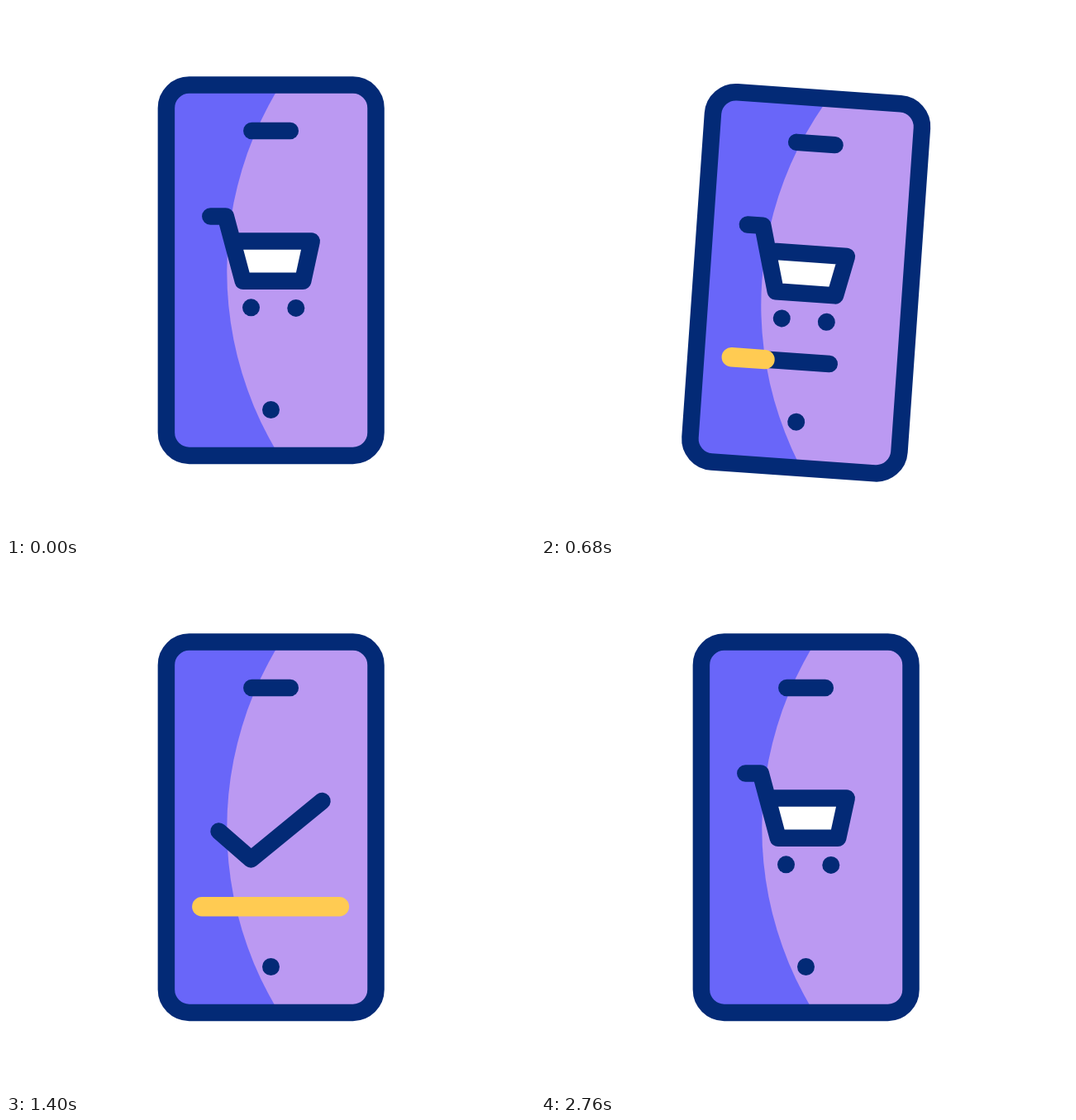
These frames come from a looping animation (640x640 px, 3 s). An HTML page with a canvas:

```html
<!DOCTYPE html>
<html lang="en">
<head>
<meta charset="utf-8">
<title>Mobile checkout</title>
<style>
  html, body { margin: 0; width: 100%; height: 100%; overflow: hidden; background: #fff; }
  canvas { display: block; width: 640px; height: 640px; }
</style>
</head>
<body>
<canvas id="stage" width="640" height="640"></canvas>
<script>
const ctx = document.getElementById('stage').getContext('2d');
const LOOP = 3000;
const NAVY = '#032a76', BLUE = '#6966f9', LILAC = '#bb99f2', YELLOW = '#ffcb52';
const LINE = 20.5;
const CENTER = { x: 320.7, y: 319.75 };

// Cubic-bezier easing with control points (x1, 0) and (x2, 1).
function bezier(x1, x2) {
  return u => {
    if (u <= 0) return 0;
    if (u >= 1) return 1;
    let lo = 0, hi = 1, s = 0.5;
    for (let i = 0; i < 24; i++) {
      s = (lo + hi) / 2;
      const r = 1 - s;
      const x = 3 * r * r * s * x1 + 3 * r * s * s * x2 + s * s * s;
      if (x < u) lo = s; else hi = s;
    }
    return s * s * (3 - 2 * s);
  };
}
const smooth = bezier(0.33, 0.67);
const trackEase = bezier(0.33, 0.45);
const fillEase = bezier(0.67, 0.67);
const settle = bezier(0.33, 0.4);

const progress = (t, from, to, ease = smooth) => ease((t - from) / (to - from));

// Keys are [time, value] pairs, eased between neighbours.
function keyed(t, keys) {
  let value = keys[0][1];
  for (let i = 1; i < keys.length; i++) {
    const [t0, v0] = keys[i - 1], [t1, v1] = keys[i];
    if (t >= t0) value = v0 + (v1 - v0) * progress(t, t0, t1);
  }
  return value;
}

function trace(points) {
  ctx.beginPath();
  points.forEach(([x, y]) => ctx.lineTo(x, y));
}

function stroke(points, color = NAVY, width = LINE) {
  trace(points);
  ctx.strokeStyle = color;
  ctx.lineWidth = width;
  ctx.stroke();
}

function strokePart(points, start, end, color, width) {
  if (end - start < 0.001) return;
  let length = 0;
  for (let i = 1; i < points.length; i++) {
    length += Math.hypot(points[i][0] - points[i - 1][0], points[i][1] - points[i - 1][1]);
  }
  ctx.save();
  ctx.setLineDash([(end - start) * length + (end === 1 ? 1 : 0), 9999]);
  ctx.lineDashOffset = -start * length;
  stroke(points, color, width);
  ctx.restore();
}

function dot(x, y, color = NAVY) {
  ctx.beginPath();
  ctx.arc(x, y, 10.5, 0, Math.PI * 2);
  ctx.fillStyle = color;
  ctx.fill();
}

function body() {
  ctx.beginPath();
  ctx.roundRect(193.9, 95.6, 253.6, 448.3, 27.8);
}

function drawCart(shift) {
  ctx.save();
  ctx.translate(shift, 0);
  const basket = [[274, 284.6], [369.7, 284.6], [359.2, 332.8], [286.8, 332.8]];
  trace(basket);
  ctx.fillStyle = '#fff';
  ctx.fill();
  stroke([[247.3, 254.5], [265.8, 254.5], [286.8, 332.8], [359.2, 332.8], [369.7, 284.6], [274, 284.6]]);
  dot(296.5, 364.8);
  dot(350.8, 365.4);
  ctx.restore();
}

function drawBar(t) {
  const bar = [[236.8, 415.8], [403.4, 415.8]];
  const erased = progress(t, 2100, 2450);
  const filled = progress(t, 280, 1128, fillEase);
  if (erased < 0.001) strokePart(bar, 0, progress(t, 280, 1010, trackEase), NAVY, LINE);
  strokePart(bar, erased, filled, YELLOW, 23.4);
}

function draw(t) {
  const angle = keyed(t, [[200, 0], [500, -5], [768, 7], [1135, 0]]);
  const lift = keyed(t, [[200, 0], [500, -30], [768, 30], [1135, 0]]);

  ctx.fillStyle = '#fff';
  ctx.fillRect(0, 0, 640, 640);
  ctx.save();
  ctx.lineCap = ctx.lineJoin = 'round';
  ctx.translate(CENTER.x, CENTER.y + lift);
  ctx.rotate(angle * Math.PI / 180);
  ctx.translate(-CENTER.x, -CENTER.y);

  ctx.save();
  body();
  ctx.clip();
  ctx.fillStyle = BLUE;
  ctx.fillRect(180, 80, 285, 480);
  ctx.beginPath();
  ctx.arc(692.3, 321, 425, 0, Math.PI * 2);
  ctx.fillStyle = LILAC;
  ctx.fill();

  if (t < 1200) {
    drawCart(keyed(t, [[640, 0], [760, -8], [1060, 240]]));
  } else if (t > 2300) {
    drawCart(-240 * (1 - progress(t, 2334, 2760, settle)));
  }
  strokePart([[257.5, 324.5], [296.5, 358.4], [382.5, 288]],
    progress(t, 2064, 2374), progress(t, 1080, 1400), NAVY, LINE);
  drawBar(t);
  ctx.restore();

  stroke([[297.3, 151], [343.8, 151]]);
  dot(320.5, 488.5);
  body();
  ctx.strokeStyle = NAVY;
  ctx.lineWidth = LINE;
  ctx.stroke();
  ctx.restore();
}

const began = performance.now();
function tick() {
  draw((performance.now() - began) % LOOP);
  requestAnimationFrame(tick);
}
tick();
</script>
</body>
</html>
```
